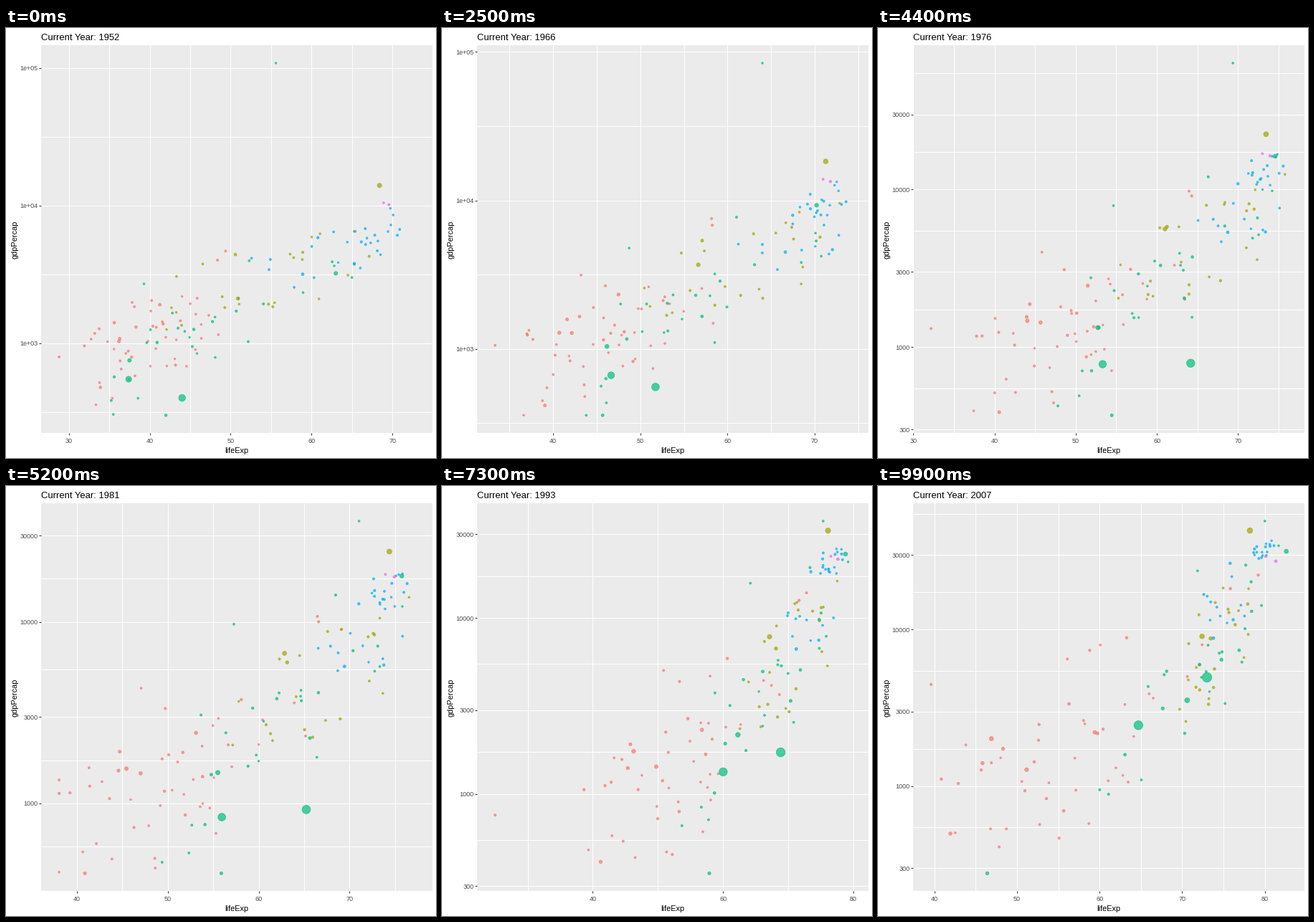
These frames come from a looping animation (600 by 600 pixels, 10000 ms). A matplotlib script:

```python
import numpy as np
import matplotlib.pyplot as plt
from matplotlib.animation import FuncAnimation

FRAMES = 100
PX = 0.72                      # points per pixel at 100 dpi
LEFT, TOP, WIDTH, HEIGHT = 49.3, 24.4, 545.2, 540.6
COLORS = dict(africa="#F8766D", americas="#A3A500", asia="#00BF7D",
              europe="#00B0F6", oceania="#E76BF3")

plt.rcParams["font.family"] = ["Liberation Sans", "DejaVu Sans"]

years = 1952 + 55 * np.arange(FRAMES) / (FRAMES - 1)
u = np.linspace(0, 1, FRAMES)


def curve(*points):
    """Value in every frame along straight pieces between (year, value) points."""
    return np.interp(years, *zip(*points))


def log_curve(*points):
    return curve(*((t, np.log10(v)) for t, v in points))


def lerp(a, b, t=u):
    return a + (b - a) * t


# Edges of the data, which the view follows.
low_life = curve((1952, 28.8), (1962, 32), (1972, 35.4), (1974.3, 36), (1977, 31.2),
                 (1978.5, 37.3), (1982, 38.4), (1987, 39.9), (1988, 39.7), (1992, 23.6),
                 (1997, 36.1), (1999.5, 39.7), (2002, 39.2), (2005.1, 41.2), (2007, 39.6))
high_life = curve((1952, 72.7), (1957, 73.5), (1962, 73.7), (1972, 74.7), (1977, 76.1),
                  (1987, 78.7), (1992, 79.4), (2002, 82), (2007, 82.6))
low_income = log_curve((1952, 299), (1959.3, 368), (1962, 355), (1963.7, 374), (1967, 349),
                       (1977, 371), (1982, 424), (1992, 347), (1994.5, 379),
                       (2002, 241), (2007, 278))
high_income = log_curve((1952, 108400), (1957, 113500), (1967, 80900), (1972, 109300),
                        (1977, 59300), (1981.4, 33750), (1985, 29360), (1992, 34930),
                        (1997, 41280), (2002, 44680), (2007, 49360))

# Largest countries: population (millions) first and last, then (year, life, income).
GIANTS = [
    ("asia", 556, 1319, (1952, 44, 400), (1957, 50.5, 576), (1962, 44.5, 488),
     (1972, 63.1, 677), (1982, 65.5, 962), (1992, 68.7, 1656), (2007, 73, 4959)),
    ("asia", 372, 1110, (1952, 37.4, 547), (1972, 50.7, 724), (1982, 56.6, 856),
     (2007, 64.7, 2452)),
    ("asia", 82, 224, (1952, 37.5, 750), (1982, 56.2, 1517), (2007, 70.6, 3541)),
    ("asia", 86, 127, (1952, 63, 3217), (1972, 73.4, 14779), (2007, 82.6, 31656)),
    ("americas", 157, 301, (1952, 68.4, 13990), (1982, 74.6, 25010), (2007, 78.2, 42952)),
    ("americas", 57, 190, (1952, 50.9, 2109), (1982, 63.3, 7031), (2007, 72.4, 9066)),
    ("africa", 33, 135, (1952, 36.3, 1077), (1982, 45.8, 1577), (2007, 46.9, 2014)),
]

# Everyone else, by region: count, then (start, end) of mean life, life spread,
# mean log income and income spread, and the easing power of life.
REGIONS = [
    ("africa", 36, (38.8, 52.5), (4.3, 6.5), (2.93, 3.02), (0.22, 0.27), 0.7),
    ("africa", 14, (44, 66), (4, 7), (3.15, 3.75), (0.22, 0.33), 0.75),
    ("americas", 23, (54, 74), (8, 2.6), (3.48, 3.88), (0.2, 0.22), 0.7),
    ("asia", 14, (42, 69), (5, 5), (2.95, 3.45), (0.22, 0.28), 0.8),
    ("asia", 13, (52, 76), (8, 3), (3.4, 4.2), (0.28, 0.3), 0.7),
    ("europe", 17, (68, 79.8), (1.9, 0.7), (3.83, 4.53), (0.13, 0.06), 1),
    ("europe", 13, (60, 75), (4, 1.5), (3.6, 4.15), (0.2, 0.2), 0.5),
    ("oceania", 2, (69.2, 80.7), (0.2, 0.4), (4.01, 4.47), (0.02, 0.06), 1.2),
]


def build():
    """Return life, log income, population (countries x frames) and colours."""
    rng = np.random.default_rng(12)
    life, income, pop, color = [], [], [], []

    def add(name, lives, logs, p0, p1):
        life.append(np.clip(lives, low_life, high_life))
        income.append(np.clip(logs, low_income, high_income))
        pop.append(lerp(p0, p1))
        color.append(COLORS[name])

    def wander(rank):
        return rank + 0.3 * np.sin(rng.uniform(0, 2 * np.pi) + 4 * u)

    for name, n, mean, spread, wealth, gap, power in REGIONS:
        for rank in np.linspace(-1.6, 1.6, n):
            z = wander(rank)
            w = wander(0.5 * rank + rng.uniform(-1.3, 1.3))
            p0 = np.clip(rng.lognormal(1.1, 1.1), 0.06, 45)
            p1 = p0 * (1.25 if name == "europe" else 2.6)
            add(name, lerp(*mean, u ** power) + z * lerp(*spread),
                lerp(*wealth) + w * lerp(*gap), p0, p1)

    # Dots riding the edges: shortest lived, poorest and richest.
    add("africa", low_life,
        curve((1952, 2.9), (1980, 3.15), (1992, 2.87), (2001, 3.03), (2007, 3.65)), 3, 8)
    add("asia", curve((1952, 42), (1962, 41), (1972, 53), (1992, 59.5), (1997, 45), (2007, 46.4)),
        low_income, 15, 50)
    add("asia", curve((1952, 55.6), (1972, 67.7), (1992, 75.2), (2007, 80)), high_income, 0.2, 2.5)

    for name, p0, p1, *points in GIANTS:
        add(name, curve(*((t, x) for t, x, _ in points)),
            log_curve(*((t, y) for t, _, y in points)), p0, p1)
    return np.array(life), np.array(income), np.array(pop), color


def padded(lo, hi):
    pad = 0.05 * (hi - lo)
    return lo - pad, hi + pad


def inside(values, lo, hi):
    return [v for v in values if lo <= v <= hi]


def minor_breaks(major, lo, hi):
    """Midpoints of the major breaks, carried one step past each end."""
    step = major[1] - major[0]
    ends = np.array([major[0] - step, *major, major[-1] + step])
    return inside((ends[1:] + ends[:-1]) / 2, lo, hi)


def income_breaks(lo, hi):
    """Whole decades if three fit, otherwise ones and threes."""
    decades = np.arange(1, 8)
    major = inside(decades, lo, hi)
    if len(major) >= 3:
        return major, [f"1e+{v:02d}" for v in major]
    major = inside(np.sort(np.r_[decades, decades + np.log10(3)]), lo, hi)
    return major, [str(round(10 ** v)) for v in major]


life, income, pop, color = build()
size = 1 + 5 * np.sqrt(pop / 1319)
area = ((2.2 * size + 0.2) * PX) ** 2

fig = plt.figure(figsize=(6, 6), dpi=100, facecolor="white")
ax = fig.add_axes([LEFT / 600, 1 - (TOP + HEIGHT) / 600, WIDTH / 600, HEIGHT / 600],
                  facecolor="#EBEBEB")
ax.set_axisbelow(True)
for side in ax.spines.values():
    side.set_visible(False)
ax.grid(True, which="both", color="white", lw=PX)
ax.tick_params(which="major", length=2.75 * PX, width=PX, color="#333333",
               labelcolor="#4D4D4D", labelsize=9 * PX)
ax.tick_params(which="minor", length=0)
ax.tick_params(axis="x", pad=4.6 * PX)
ax.tick_params(axis="y", pad=2.2 * PX)

title = fig.text(49 / 600, 1 - 17 / 600, "", size=13 * PX)
fig.text((LEFT + WIDTH / 2) / 600, 1 - 593 / 600, "lifeExp", size=11 * PX, ha="center")
fig.text(12.5 / 600, 1 - 295 / 600, "gdpPercap", size=11 * PX, rotation=90,
         ha="center", va="center")
dots = ax.scatter(life[:, 0], income[:, 0], s=area[:, 0], c=color, edgecolors=color,
                  alpha=0.7, linewidths=0.8 * PX, zorder=3)


def draw(i):
    x0, x1 = padded(low_life[i], high_life[i])
    y0, y1 = padded(low_income[i], high_income[i])

    xs = inside(np.arange(0, 121, 20 if x1 - x0 > 57.8 else 10), x0, x1)
    ys, labels = income_breaks(y0, y1)
    ax.set_xticks(xs)
    ax.set_xticks(minor_breaks(xs, x0, x1), minor=True)
    ax.set_yticks(ys, labels)
    ax.set_yticks(minor_breaks(ys, y0, y1), minor=True)
    ax.set_xlim(x0, x1)
    ax.set_ylim(y0, y1)

    dots.set_offsets(np.c_[life[:, i], income[:, i]])
    dots.set_sizes(area[:, i])
    title.set_text(f"Current Year: {round(years[i])}")
    return dots, title


anim = FuncAnimation(fig, draw, frames=FRAMES, interval=100, repeat=True, repeat_delay=0)
plt.show()
```
